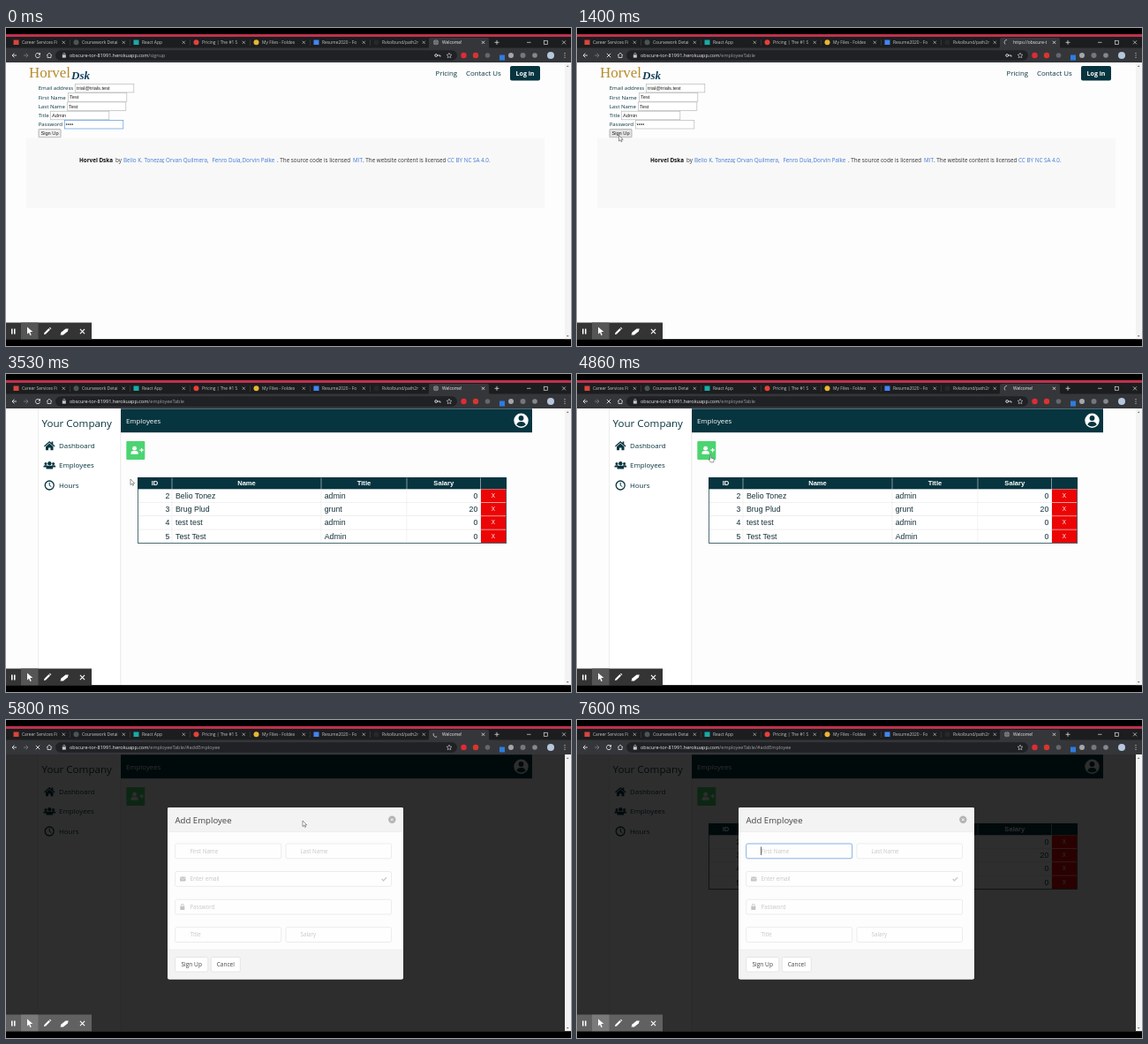
Write an HTML page that moves like this. It is 640 px wide and 360 px high and loops after 8000 ms.

```html
<!DOCTYPE html>
<html lang="en">
<head>
<meta charset="utf-8">
<title>Employee table walkthrough</title>
<style>
  html, body { margin: 0; width: 100%; height: 100%; overflow: hidden; background: #000; }
  svg { display: block; width: 640px; height: 360px; font-family: "Open Sans", "Noto Sans", sans-serif; }
  text { white-space: pre; }
  .arial { font-family: "Liberation Sans", Arial, sans-serif; }
  .serif { font-family: "Liberation Serif", serif; }
  .b { font-weight: 700; }
  .i { font-style: italic; }
  .mid { text-anchor: middle; }
  .end { text-anchor: end; }
</style>
</head>
<body>
<svg id="stage" viewBox="0 0 640 360"></svg>
<script>
const TEAL = '#07353f', LINK = '#4078d4', BAR = '#35363a', GREY = '#d5d6d8', FAINT = '#e4e4e4';
const LOOP = 8000;

const text = (x, y, size, fill, str, cls = '', id = '') =>
  `<text x="${x}" y="${y}" font-size="${size}" fill="${fill}" class="${cls}" ${id && `id="${id}"`}>${str}</text>`;
const rect = (x, y, w, h, fill, more = '') =>
  `<rect x="${x}" y="${y}" width="${w}" height="${h}" fill="${fill}" ${more}/>`;
const box = (x, y, w, h, stroke, r = 0, fill = '#fff', id = '') =>
  rect(x, y, w, h, fill, `rx="${r}" stroke="${stroke}" stroke-width=".7" ${id && `id="${id}"`}`);
const dot = (x, y, r, fill) => `<circle cx="${x}" cy="${y}" r="${r}" fill="${fill}"/>`;
const fill = (d, color, more = '') => `<path d="${d}" fill="${color}" ${more}/>`;
const line = (d, color, width = 1) => `<path d="${d}" fill="none" stroke="${color}" stroke-width="${width}"/>`;
const cross = (x, y, r, color, width = .8) =>
  line(`M${x - r} ${y - r}l${2 * r} ${2 * r}m0 ${-2 * r}l${-2 * r} ${2 * r}`, color, width);
const group = (id, body) => `<g id="${id}">${body}</g>`;
const person = (x, y, s, color) =>
  dot(x, y - 2.2 * s, 2.1 * s, color) +
  fill(`M${x - 3.6 * s} ${y + 3.6 * s}v${-s}q0-${2.4 * s} ${2.4 * s}-${2.4 * s}h${2.4 * s}q${2.4 * s} 0 ${2.4 * s} ${2.4 * s}v${s}z`, color);

function browser() {
  const tabs = [
    ['Career Services Fi', '#d9453c'], ['Coursework Detai', '#4b5557'], ['React App', '#19aaa8'],
    ['Pricing | The #1 S', '#e8403a'], ['My Files - Foldex', '#e9b632'], ['Resume2020 - Fo', '#4285f4'],
    ['Rvkolbund/path2r', '#26282b']];
  let out = rect(0, 0, 640, 7, '#000') + rect(0, 7, 640, 3, '#bf314d') +
    rect(0, 10, 640, 13, '#1c1d1f') + rect(0, 22.5, 640, 16.5, BAR) +
    fill('M477 23q2 0 2-2v-8q0-2 2-2h64q2 0 2 2v8q0 2 2 2z', BAR);
  tabs.forEach(([title, color], n) => {
    const x = 8 + 68 * n;
    out += (n === 2 || n === 5 || n === 0 ? rect(x + .5, 13.5, 6, 5.5, color) : dot(x + 3.5, 16.3, 3, color)) +
      text(x + 10, 18.3, 4.9, '#c3c5c8', title) + cross(x + 57.3, 16.3, 1.6, '#c3c5c8', .7);
    if (n < 6) out += rect(x + 64, 13, .5, 7, '#4a4b4e');
  });
  out += text(494, 18.3, 4.9, '#eee', '', '', 'title') +
    group('globe', dot(487, 16.3, 3, '#85888c') + line('M484 16.3h6M487 13.3q-2.6 3 0 6M487 13.3q2.6 3 0 6', '#4a4b4f', .5)) +
    group('spinner', line('M487 13.4a2.9 2.9 0 0 0-1.9 5.1', '#c9cbd0', .8)) +
    cross(540.5, 16.3, 1.6, '#eee', .8) + line('M553.5 16.3h5M556 13.8v5', '#ddd', .8) +
    line('M590 16.3h4.5', '#ddd', .7) + rect(609.3, 14.3, 4, 4, 'none', 'stroke="#ddd" stroke-width=".7"') +
    cross(632, 16.3, 2, '#ddd', .7);
  // toolbar
  out += line('M12 31H7m2.4-2.4L7 31l2.4 2.4', '#e3e4e6', .9) +
    line('M20 31h5m-2.4-2.4L25 31l-2.4 2.4', '#77797c', .9) +
    group('reload', line('M38 29.4a2.6 2.6 0 1 0 .5 2.3', '#e3e4e6', .9) + fill('M39 27.8v2.7h-2.7z', '#e3e4e6')) +
    group('stop', cross(36, 31, 2.2, '#e3e4e6', .9)) +
    line('M46 31l3-2.8 3 2.8M47 30.5v3h4v-3', '#e3e4e6', .8) +
    rect(56, 25.3, 455, 11.4, '#202124', 'rx="5.7"') +
    rect(63.8, 30.3, 4, 3.3, '#c6c8ca') + line('M64.7 30.5v-1q0-1.2 1.1-1.2t1.1 1.2v1', '#c6c8ca', .7) +
    `<text x="72" y="33" font-size="5.5" fill="#f0f0f0">obscure-tor-81991.herokuapp.com<tspan id="path" fill="#9aa0a6"></tspan></text>` +
    group('key', line('M488.5 31h3.4v1.6', GREY, 1) + `<circle cx="487.2" cy="31" r="1.4" fill="none" stroke="${GREY}"/>`) +
    line('M502 28.2l.9 1.9 2 .2-1.5 1.4.4 2-1.8-1-1.8 1 .4-2-1.5-1.4 2-.2z', GREY, .6) +
    dot(518.5, 31, 3.2, '#e02b36') + dot(532, 31, 3.2, '#d8352f') + dot(545.5, 31, 2.8, '#64676b') +
    rect(559, 30.5, 6, 6, '#2d7de0') + dot(572, 31, 3, '#a3a6aa') + dot(585.5, 31, 3, '#74777c') +
    dot(599, 31, 2.8, '#85888d') + dot(617, 31, 4, '#b5c6dd') +
    [28.7, 31, 33.3].map(y => dot(633, y, .6, GREY)).join('');
  return out;
}

function signupPage() {
  const fields = [['Email address', 78, 63, 'trial@trials.test'], ['First Name', 70, 73.3, 'Test'],
    ['Last Name', 69, 83.6, 'Test'], ['Title', 50, 93.9, 'Admin'], ['Password', 66, 104.1, '']];
  let out = text(26, 55.5, 16.9, '#b98a2c', 'Horvel', 'serif') + text(74, 57.5, 13, '#123f5a', 'Dsk', 'serif b i') +
    text(486.5, 54.2, 7.8, TEAL, 'Pricing') + text(521, 54.2, 7.9, TEAL, 'Contact Us') +
    rect(571, 43, 34, 16.5, TEAL, 'rx="2"') + text(588, 53.8, 7, '#fff', 'Log in', 'b mid');
  for (const [label, x, y, value] of fields)
    out += text(36.7, y + 7.3, 6.1, TEAL, label) +
      box(x + .3, y + .3, 66.5, 9.6, '#b9b9b9', 0, '#fff', label === 'Password' ? 'password' : '') +
      text(x + 2, y + 7.1, 5.7, '#222', value, 'arial');
  for (let n = 0; n < 4; n++) out += dot(68.6 + 2.2 * n, 109.1, .8, '#222');
  out += box(37, 114.6, 25, 9.2, '#9a9a9a', .5, '#efefef', 'submit') + text(49.5, 121.3, 5.7, '#222', 'Sign Up', 'arial mid') +
    rect(23, 124.5, 587, 79.5, '#f8f8f8');
  const credits = [[83, 'Horvel Dska', '#111', 'b'], [124, 'by', '#333'], [133, 'Belio K. Tonezar', LINK], [177.5, ',', '#333'],
    [181, 'Orvan Quilmera,', LINK], [233.5, 'Fenro Dula,', LINK], [267.5, 'Dorvin Palke', LINK],
    [307, '. The source code is licensed', '#333'], [393, 'MIT', LINK], [404, '. The website content is licensed', '#333'],
    [500, 'CC BY NC SA 4.0.', LINK]];
  for (const [x, str, color, cls] of credits) out += text(x, 151.7, 6.3, color, str, cls);
  return out;
}

function employeePage() {
  const edges = [149, 188, 357, 454, 537.5, 567];
  const rows = [[2, 'Belio Tonez', 'admin', 0], [3, 'Brug Plud', 'grunt', 20], [4, 'test test', 'admin', 0], [5, 'Test Test', 'Admin', 0]];
  let out = rect(36, 39, 94, 313, '#fff') + rect(36, 39, .8, 313, '#e9e9e9') + rect(129.3, 66, 1, 286, '#e9e9e9') +
    text(40.5, 60, 11.6, TEAL, 'Your Company') +
    fill('M43 81.5l6.2-5.4 2.4 2v-1.6h1.7v3l2.2 2-.8 1-5.5-4.8-5.4 4.8z', TEAL) +
    fill('M45 82.3l4.2-3.7 4.3 3.7v4h-3v-2.8h-2.5v2.8h-3z', TEAL) +
    person(45, 103, .72, TEAL) + person(53.6, 103, .72, TEAL) + person(49.3, 103.6, 1.05, TEAL) +
    `<circle cx="49.2" cy="126" r="5" fill="none" stroke="${TEAL}" stroke-width="1.3"/>` + line('M49.2 122.8v3.3l2.2 1.6', TEAL) +
    text(60, 84, 7.9, TEAL, 'Dashboard') + text(60, 106.4, 7.9, TEAL, 'Employees') + text(60, 128.8, 7.9, TEAL, 'Hours') +
    rect(130, 39.3, 466, 26.9, TEAL) + text(136, 56, 7.8, '#fff', 'Employees') +
    dot(583.5, 52.7, 8.2, '#fff') + dot(583.5, 50, 2.9, TEAL) + fill('M578.3 57.5q1-3.4 5.2-3.4t5.2 3.4q-5.2 4-10.4 0z', TEAL) +
    rect(136.3, 76, 21, 21, '#4bd471', 'rx="1"') + person(145.6, 86.7, 1.15, '#fff') + line('M151.3 86.2h4.6M153.6 83.9v4.6', '#fff', 1.2);

  let table = rect(149, 117, 418, 75, '#fff') + rect(149, 117, 418, 13.3, TEAL);
  ['ID', 'Name', 'Title', 'Salary'].forEach((name, n) => {
    table += text((edges[n] + edges[n + 1]) / 2, 126.4, 7.6, '#fff', name, 'arial b mid') +
      rect(edges[n + 1] - .3, 117, .6, 13.3, '#cfd8da') + rect(edges[n + 1] - .3, 130.3, .5, 61, FAINT);
  });
  rows.forEach(([id, name, title, salary], n) => {
    const y = 130.3 + 15.3 * n, base = y + 10.4;
    table += rect(149, y + 14.9, 418, .5, '#e0e0e0') +
      text(185.3, base, 8.8, '#17323b', id, 'arial end') + text(192, base, 8.8, '#17323b', name, 'arial') +
      text(360.7, base, 8.8, '#17323b', title, 'arial') + text(534.3, base, 8.8, '#17323b', salary, 'arial end') +
      rect(538, y + .2, 28.4, 14.7, '#ec0505') + text(552, y + 9.4, 6.4, '#fff', 'X', 'arial mid');
  });
  table += box(149.4, 117.3, 417.3, 74.3, TEAL, 0, 'none');
  return out + group('table', table);
}

function modal() {
  const inputs = [[191.7, 140, 120, 'First Name', 208.5], [317, 140, 119.5, 'Last Name', 333.5], [191.7, 171.5, 244.8, 'Enter email', 208.5],
    [191.7, 203.2, 244.8, 'Password', 208.5], [191.7, 234.7, 120, 'Title', 208.5], [317, 234.7, 119.5, 'Salary', 333.5]];
  let out = rect(0, 39, 633, 313, '#000', 'opacity=".82"') + rect(183, 99, 267, 194.4, '#fdfdfd', 'rx="2"') +
    fill('M183 126.5V101q0-2 2-2h263q2 0 2 2v25.5z', '#f3f3f3') + fill('M183 260v31.4q0 2 2 2h263q2 0 2-2V260z', '#f3f3f3') +
    rect(183, 126.3, 267, .5, FAINT) + rect(183, 259.8, 267, .5, FAINT) +
    text(191.5, 116.5, 9.6, '#444', 'Add Employee') + dot(437.3, 112.8, 4.2, '#b4b4b4') + cross(437.3, 112.8, 1.4, '#fff', .9);
  inputs.forEach(([x, y, w, label, tx], n) => {
    out += box(x, y, w, 16.8, FAINT, 1.8, '#fefefe', n ? '' : 'first') + text(tx, y + 10.7, 6.25, '#c6c6c6', label);
  });
  out += rect(197, 177.6, 6.5, 4.8, '#c4c4c4', 'rx=".6"') + line('M197 178.5l3.2 2 3.3-2', '#fff', .6) +
    rect(197.3, 211, 5, 4, '#c4c4c4', 'rx=".5"') + line('M198.3 211.3v-1.3q0-1.6 1.5-1.6t1.5 1.6v1.3', '#c4c4c4', .9) +
    line('M425.7 180l1.8 1.9 3.6-3.8', '#c4c4c4', 1.2) +
    box(191.7, 268.5, 37, 16.5, '#ddd', 1.8) + text(210.2, 279.2, 6.6, '#444', 'Sign Up', 'mid') +
    box(232.3, 268.5, 33, 16.5, '#ddd', 1.8) + text(248.8, 279.2, 6.5, '#444', 'Cancel', 'mid');
  return out;
}

function recorder() {
  return rect(0, 352.3, 640, 7.7, '#000') + rect(0, 333.5, 97, 18.8, '#343434') + rect(17, 333.5, 19.5, 18.8, '#555') +
    group('glow', rect(0, 333.5, 97, 18.8, '#fff', 'opacity=".22"')) +
    rect(6, 340.5, 1.5, 6, '#fff') + rect(9, 340.5, 1.5, 6, '#fff') +
    fill('M24 338.5l6.3 5.6h-3l1.4 3.3-1.3.5-1.4-3.2-2 1.9z', '#fff') +
    fill('M43 347l.4-2 5-5 1.6 1.6-5 5zM49 339.5l.8-.8 1.6 1.6-.8.8z', '#fff') +
    fill('M62.5 344.5l5-4h3.3l-1 3-5 4h-3.3z', '#fff') + cross(86.5, 343.5, 2.6, '#fff', 1.1);
}

function cursor() {
  const outline = 'stroke="#333" stroke-width=".5"';
  return group('arrow', fill('M0 0v6.6l1.6-1.4 1 2.2 1-.5-1-2.1h2.1z', '#fff', outline)) +
    group('hand', fill('M-.5.3q.8-.9 1.4 0v2.8l2.6.6q.9.3.7 1.4l-.6 2.8h-3.3l-2.3-3q.2-1 1.5 0z', '#fff', outline)) +
    group('beam', line('M0-4.7v9.4', '#333', .8));
}

document.getElementById('stage').innerHTML =
  rect(0, 38.5, 640, 314, '#fdfdfd') + group('signup', signupPage()) + group('employees', employeePage()) +
  group('modal', modal()) + rect(633, 38.5, 7, 314, '#f3f3f3') +
  fill('M634.8 44h2.8l-1.4-1.8z', '#777') + fill('M634.8 348h2.8l-1.4 1.8z', '#777') +
  browser() + recorder() + group('cursor', cursor());

const el = {};
document.querySelectorAll('[id]').forEach(node => el[node.id] = node);
const show = (name, on) => el[name].style.display = on ? '' : 'none';
const within = (t, a, b) => t >= a && t < b;

// time, x, y of the pointer
const pointer = [[100, 110, 143], [800, 47.5, 121.5], [1450, 47.5, 121.5], [2250, 333, 178], [2460, 333, 181], [3000, 333, 181],
  [3060, 328, 198], [3220, 290, 206], [3530, 141, 119], [4000, 148, 95], [4250, 151, 92], [4950, 151, 92],
  [5600, 336, 114], [5850, 336, 114], [6530, 228, 152], [6720, 216, 157], [7060, 208.6, 148.2], [LOOP + 1, 208.6, 148.2]];

function pointerAt(t) {
  const next = pointer.findIndex(p => p[0] > t);
  const [t0, x0, y0] = pointer[next - 1], [t1, x1, y1] = pointer[next];
  const u = (t - t0) / (t1 - t0), k = u * u * (3 - 2 * u);
  return [x0 + (x1 - x0) * k, y0 + (y1 - y0) * k];
}

function render(t) {
  const loading = within(t, 950, 1950) || within(t, 4600, 6300);
  const employees = t >= 1870, reopened = t >= 5300, focused = t >= 7590;
  const fade = Math.min(1, Math.max(0, (t - 5400) / 380)) ** 1.7;
  show('signup', !employees);
  show('employees', employees);
  show('table', within(t, 2450, 5300) || t >= 6150);
  el.modal.style.opacity = el.glow.style.opacity = fade;
  show('globe', !loading);
  show('spinner', loading);
  show('reload', !loading);
  show('stop', loading);
  show('key', !reopened);
  el.spinner.setAttribute('transform', `rotate(${(t - 1400) / 1153 * 360} 487 16.3)`);
  el.title.textContent = within(t, 950, 1870) ? 'https://obscure-t' : 'Welcome!';
  el.path.textContent = t < 950 ? '/signup' : reopened ? '/employeeTable/#addEmployee' : '/employeeTable';
  el.password.setAttribute('stroke', t < 900 ? '#5b97dc' : '#b9b9b9');
  el.submit.setAttribute('fill', within(t, 750, 1870) ? '#e4e4e4' : '#efefef');
  el.first.setAttribute('stroke', focused ? '#86b1e4' : FAINT);
  el.first.setAttribute('stroke-width', focused ? 1 : .7);

  const visible = t >= 100;
  show('cursor', visible);
  if (!visible) return;
  const [x, y] = pointerAt(t);
  const beam = t > 5850 && x < 312 && within(y, 140, 157.5), hand = within(t, 4050, 5000);
  show('arrow', !hand && !beam);
  show('hand', hand);
  show('beam', beam);
  el.cursor.setAttribute('transform', `translate(${x} ${y})`);
}

const start = performance.now();
function tick() {
  render((performance.now() - start) % LOOP);
  requestAnimationFrame(tick);
}
tick();
</script>
</body>
</html>
```
